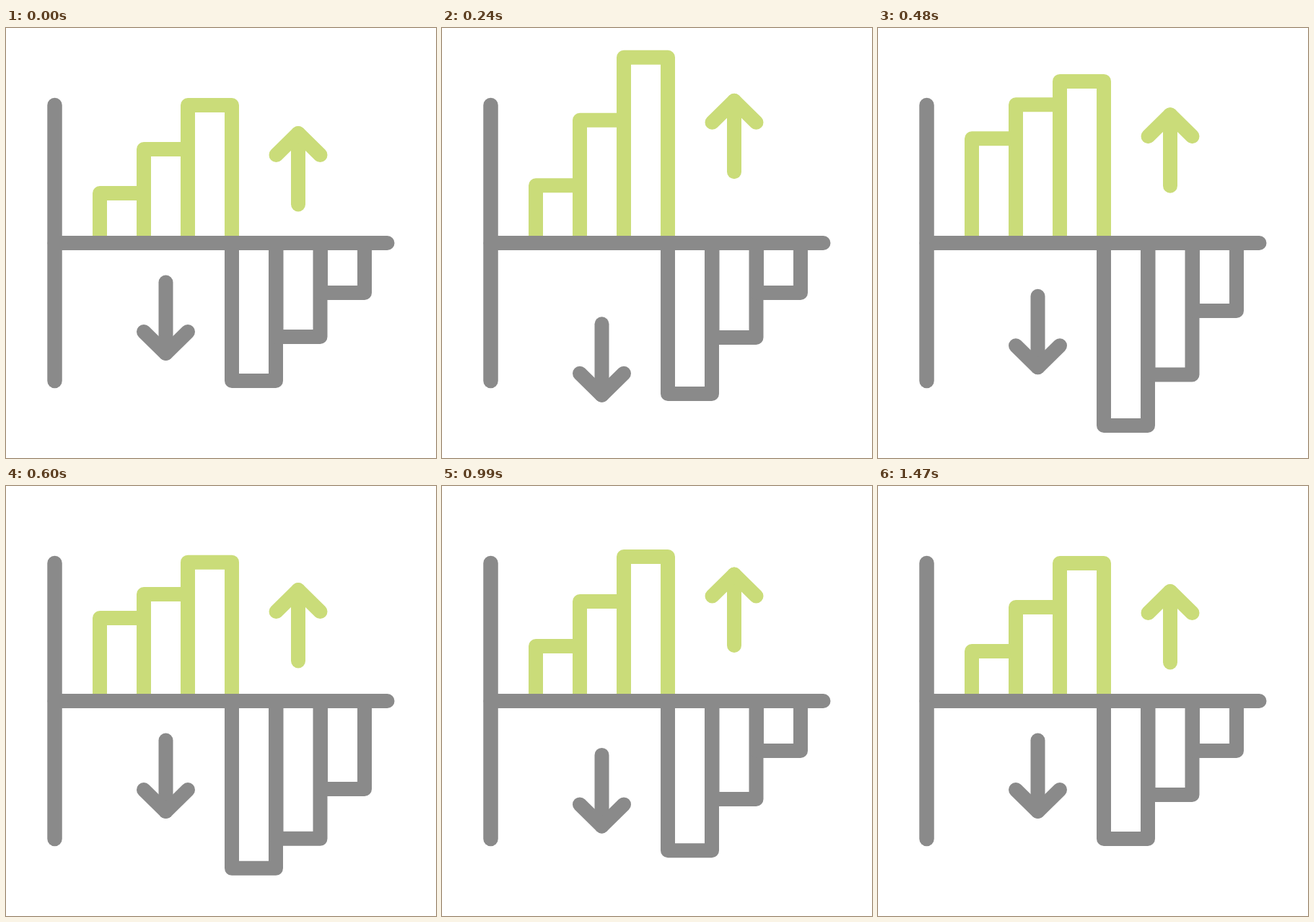
These frames come from a looping animation (596 px wide and 596 px high, 1.5 s). An HTML page with a canvas:

```html
<!DOCTYPE html>
<html lang="en">
<head>
<meta charset="utf-8">
<title>Rising and falling bars</title>
<style>
  html, body { margin: 0; width: 100%; height: 100%; overflow: hidden; background: #fff; }
  canvas { display: block; width: 596px; height: 596px; }
</style>
</head>
<body>
<canvas id="stage" width="596" height="596"></canvas>
<script>
const ctx = document.getElementById('stage').getContext('2d');
const LOOP = 1500, STEP = 30;
const GREEN = '#cadc79', GREY = '#8a8a8a';
const AXIS_Y = 298;

// Each part swings out and back twice: heights, then start, peak, rest, peak, rest in ms.
const risingBars = [
  { x: 130, y: 229, swing: [76, 8.1], keys: [165, 470, 770, 1060, 1350] },
  { x: 191, y: 168, swing: [76.5, 8], keys: [80, 390, 700, 990, 1280] },
  { x: 252, y: 107, swing: [75, 11], keys: [0, 309, 627, 908, 1198] }
];
const fallingBars = [
  { x: 313, y: 489, swing: [62, 18], keys: [100, 486, 773, 1047, 1281] },
  { x: 374.5, y: 428, swing: [62, 16], keys: [212, 572, 896, 1120, 1359] },
  { x: 436, y: 367, swing: [62, 7.6], keys: [313, 695, 995, 1280, 1470] }
];
const upArrow = { x: 405, y: 146, swing: [52.5, 24], keys: [0, 317, 640, 965, 1225] };
const downArrow = { x: 221.5, y: 451, swing: [63, 28], keys: [0, 295, 590, 888, 1180] };

const ease = p => (1 - Math.cos(Math.PI * p)) / 2;

function offset({ swing, keys }, t) {
  const values = [0, swing[0], 0, swing[1], 0];
  for (let i = 0; i < 4; i++) {
    if (t >= keys[i] && t < keys[i + 1]) {
      const p = ease((t - keys[i]) / (keys[i + 1] - keys[i]));
      return values[i] + (values[i + 1] - values[i]) * p;
    }
  }
  return 0;
}

function line(color, ...points) {
  ctx.strokeStyle = color;
  ctx.beginPath();
  points.forEach(([x, y]) => ctx.lineTo(x, y));
  ctx.stroke();
}

function arrow(color, x, tip, dir) {
  line(color, [x, tip], [x, tip + dir * 98.5]);
  line(color, [x - 30.5, tip + dir * 30], [x, tip], [x + 30.5, tip + dir * 30]);
}

function draw(t) {
  ctx.fillStyle = '#fff';
  ctx.fillRect(0, 0, 596, 596);
  ctx.lineWidth = 20;
  ctx.lineJoin = ctx.lineCap = 'round';

  for (const bar of risingBars) {
    const y = bar.y - offset(bar, t), right = bar.x + 61;
    line(GREEN, [bar.x, AXIS_Y], [bar.x, y], [right, y], [right, AXIS_Y]);
  }
  for (const bar of fallingBars) {
    const y = bar.y + offset(bar, t), right = bar.x + 61;
    line(GREY, [bar.x, AXIS_Y], [bar.x, y], [right, y], [right, AXIS_Y]);
  }
  arrow(GREEN, upArrow.x, upArrow.y - offset(upArrow, t), 1);
  arrow(GREY, downArrow.x, downArrow.y + offset(downArrow, t), -1);

  line(GREY, [67.5, AXIS_Y], [528.5, AXIS_Y]);
  ctx.lineWidth = 20.5;
  line(GREY, [67.5, 107], [67.5, 489]);
}

function tick(now) {
  draw(Math.floor((now % LOOP) / STEP) * STEP);
  requestAnimationFrame(tick);
}
draw(0);
requestAnimationFrame(tick);
</script>
</body>
</html>
```
